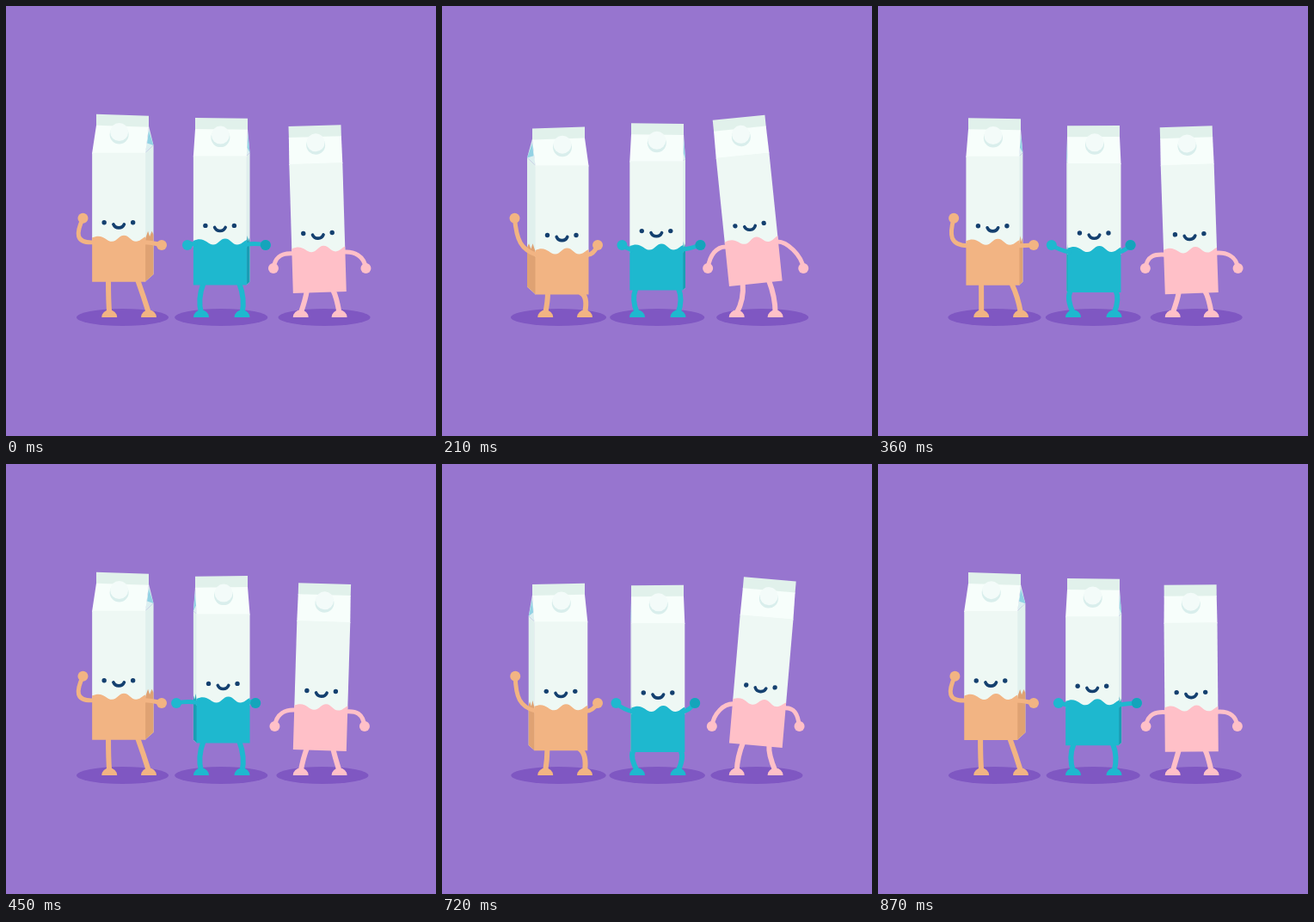
An HTML page with a canvas that plays this animation: 500x500 px, repeating every 0.9 s.

```html
<!DOCTYPE html>
<html>
<head>
<meta charset="utf-8">
<title>Dancing cartons</title>
<style>
html, body { margin: 0; width: 100%; height: 100%; overflow: hidden; background: #9775cf; }
canvas { display: block; }
</style>
</head>
<body>
<canvas id="stage" width="500" height="500"></canvas>
<script>
const ctx = document.getElementById('stage').getContext('2d');
const LOOP = 900, BEAT = 450, WIDTH = 62, SHOULDER = -150, STRIP = -181, TOP = -194;
const ORANGE = '#f2b483', TEAL = '#1eb8cf', DARK_TEAL = '#14a4bb', PINK = '#ffc0c8', NAVY = '#14406f';

const wave = (t, peak, period) => Math.cos((t - peak) / period * 2 * Math.PI);

function poly(color, ...points) {
  ctx.fillStyle = color;
  ctx.beginPath();
  for (const [x, y] of points) ctx.lineTo(x, y);
  ctx.fill();
}

function dot(color, x, y, rx, ry = rx) {
  ctx.fillStyle = color;
  ctx.beginPath();
  ctx.ellipse(x, y, rx, ry, 0, 0, 7);
  ctx.fill();
}

// Two control points make a cubic curve, one makes a quadratic.
function limb(color, width, from, ...rest) {
  ctx.strokeStyle = color;
  ctx.lineWidth = width;
  ctx.lineCap = 'round';
  ctx.beginPath();
  ctx.moveTo(...from);
  const coords = rest.flat();
  if (coords.length === 6) ctx.bezierCurveTo(...coords);
  else ctx.quadraticCurveTo(...coords);
  ctx.stroke();
}

function arm(color, shoulder, ...rest) {
  limb(color, 5, shoulder, ...rest);
  dot(color, ...rest.at(-1), 6);
}

function leg(color, hip, knee, footX) {
  limb(color, 6, hip, knee, [footX, 357]);
  ctx.fillStyle = color;
  ctx.beginPath();
  ctx.ellipse(footX, 362, 9, 8.5, 0, Math.PI, 0);
  ctx.fill();
}

const shadow = (x, rx) => dot('#7f57c2', x, 362, rx, 10);

// Side panel; `turn` > 0 shows the left side, < 0 the right one.
function side(left, ridge, turn, color) {
  const right = turn < 0;
  const front = right ? left + WIDTH - .5 : left + .5;
  const fold = right ? ridge + 61 : ridge;
  const outer = front - 10 * turn, rise = 9 * Math.abs(turn);
  const at = (k, y) => [front + (outer - front) * k, y - rise * k];
  poly('#e0f0ed', [front, 0], [front, SHOULDER], at(1, SHOULDER), at(1, 0));
  poly('#dceff0', [fold, STRIP], [front, SHOULDER], at(1, SHOULDER));
  poly('#92d2e4', [fold, STRIP + 5], at(1, SHOULDER), at(.25, SHOULDER - 9));
  poly(color, [front, 0], at(0, -49), at(.35, -56), at(.55, -48), at(.8, -52), at(1, -46), at(1, 0));
}

// Front panel with its bottom left corner at (left, 0).
function front(left, ridge, skew, color) {
  const right = left + WIDTH, mid = left + WIDTH / 2, end = ridge + 61;
  poly('#e1f1eb', [ridge, STRIP + skew + 1], [ridge, TOP + skew], [end, TOP - skew], [end, STRIP - skew + 1]);
  poly('#f7fefb', [left, SHOULDER + 1], [left, SHOULDER], [ridge, STRIP + skew],
       [end, STRIP - skew], [right, SHOULDER], [right, SHOULDER + 1]);
  poly('#eef8f4', [left, -44], [left, SHOULDER], [right, SHOULDER], [right, -44]);
  dot('#d9eeec', mid + .5, -171.3, 11);
  dot('#f3fbf9', mid + .5, -174.3, 10.5);

  ctx.fillStyle = color;
  ctx.beginPath();
  ctx.moveTo(left, 0);
  ctx.lineTo(left, -51.5);
  ctx.bezierCurveTo(left + 13, -57, left + 16, -47, left + 23, -47);
  ctx.bezierCurveTo(left + 29, -47, left + 31, -54, left + 37, -54);
  ctx.bezierCurveTo(left + 43, -54, left + 45, -47, left + 51, -47);
  ctx.bezierCurveTo(left + 56, -47, left + 58, -51, right, -52.5);
  ctx.lineTo(right, 0);
  ctx.fill();

  dot(NAVY, mid - 17, -69, 2.7);
  dot(NAVY, mid + 16.5, -69, 2.7);
  limb(NAVY, 3.6, [mid - 6.3, -67], [mid - 4, -61.5], [mid + 4, -61.5], [mid + 6.3, -67]);
}

function carton(left, ridge, bottom, turn, color, sideColor) {
  ctx.save();
  ctx.translate(0, bottom);
  side(left, ridge, turn, sideColor);
  front(left, ridge, turn, color);
  ctx.restore();
}

function orange(t) {
  const turn = -wave(t, 440, BEAT);
  const bottom = 328.1 + 7.4 * turn, left = 104.3 + 4.2 * turn, y = bottom - 46;
  shadow(135.5, 54.5 + turn);
  leg(ORANGE, [121 + 2 * turn, bottom - 2], [121 + 2 * turn, 343], 120.2);
  leg(ORANGE, [left + 53, bottom - 2], [165 + 5 * turn, 338], 166);
  carton(left, 105, bottom, turn, ORANGE, '#dfa273');
  arm(ORANGE, [left + 2, y], [86 + 6 * turn, 280 + 4 * turn],
      [84 + 2.5 * turn, 268 + 4 * turn], [87 - 2.5 * turn, 246.8]);
  arm(ORANGE, [left + 60, y], [left + 68, y], [181, 278]);
}

function teal(t) {
  const bounce = wave(t, 300, BEAT), yaw = wave(t, 85, LOOP);
  const bottom = 328.2 + 7.4 * bounce, left = 219.7 - 2.2 * yaw, y = bottom - 47;
  const squat = (bounce + 1) / 2;
  const handL = 204.5 + 7.7 * yaw, handR = 296 + 7 * yaw;
  shadow(250.2, 53.5 + 2.3 * squat);
  leg(TEAL, [232 - 10 * squat, bottom - 2], [224 - 6 * squat, 341], 227);
  leg(TEAL, [269 + 9 * squat, bottom - 2], [277 + 5 * squat, 341], 274.5);
  carton(left, 220, bottom, -yaw / 2, TEAL, '#1a9db4');
  arm(TEAL, [left + 2, y], [(left + handL) / 2, y - 2], [handL, 278]);
  arm(TEAL, [left + 60, y], [(left + WIDTH + handR) / 2, y - 2], [handR, 278]);
  dot(DARK_TEAL, handR, 278, 6);
}

function pink(t) {
  const sway = wave(t, 184, LOOP), angle = -5.95 * sway * Math.PI / 180;
  const bottom = 328.3 + 6.6 * wave(t, 395, BEAT), x = 364.8;
  const spin = (dx, dy) => [
    x + dx * Math.cos(angle) - dy * Math.sin(angle),
    bottom + dx * Math.sin(angle) + dy * Math.cos(angle)
  ];
  const armTo = (shoulder, hand, out) =>
    arm(PINK, shoulder, [shoulder[0] + 12 * out, shoulder[1] - 1], [hand - 2 * out, 290], [hand, 305]);
  shadow(369 + 3.7 * sway, 53.5);
  leg(PINK, spin(-15, -2), [347 + 4.5 * sway, 341], 342.7);
  leg(PINK, spin(15.5, -2), [383 + 4.5 * sway, 338], 387.6);
  ctx.save();
  ctx.translate(x, bottom);
  ctx.rotate(angle);
  front(-31, -30.5, 0, PINK);
  ctx.restore();
  armTo(spin(-29, -46), 311.7 - 2.6 * sway, -1);
  armTo(spin(29, -46), 417.7 + 2.6 * sway, 1);
}

function draw() {
  const t = performance.now() % LOOP;
  ctx.fillStyle = '#9775cf';
  ctx.fillRect(0, 0, 500, 500);
  orange(t);
  teal(t);
  pink(t);
  requestAnimationFrame(draw);
}
draw();
</script>
</body>
</html>
```
